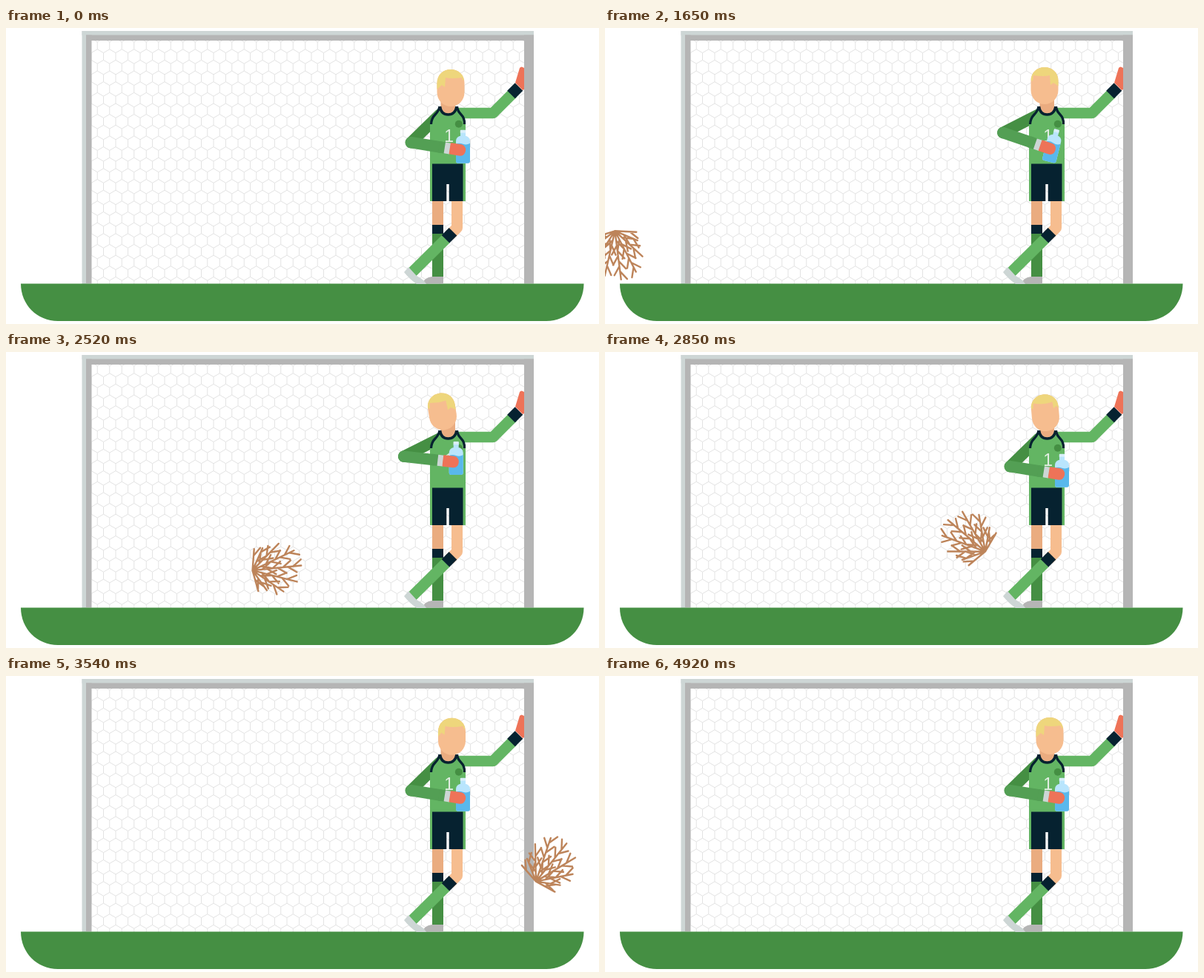
These frames come from a looping animation (800x400 px, 4.95 s). An HTML page with a canvas:

```html
<!DOCTYPE html>
<html lang="en">
<head>
<meta charset="utf-8">
<title>Goalkeeper and tumbleweed</title>
<style>
  html, body { margin: 0; width: 100%; height: 100%; overflow: hidden; background: #fff; }
  canvas { display: block; }
</style>
</head>
<body>
<canvas id="stage" width="800" height="400"></canvas>
<script>
const g = document.getElementById('stage').getContext('2d');
const LOOP = 4950;
const GREEN = '#63b563', MID = '#539f54', DARK = '#458f43', NAVY = '#062230';
const SKIN = '#f6bd8f', SHADE = '#eaac80', GLOVE = '#ee7358', LIGHT = '#cdd6d5', GREY = '#b5b5b5';
const rad = d => d * Math.PI / 180;

// Keys: time, then values
const headKeys = [ // x, y, tilt, turn
  [0, 600, 81, 0, -1], [60, 600, 81, 0, -1], [520, 597, 79, 0, 0], [1100, 597, 79, 0, 0],
  [1450, 593, 77.5, 0, 1], [1650, 593, 78, 0, 1], [2520, 588.5, 80.5, -9, 1],
  [3210, 600, 84, 0, 0], [3700, 602, 81, 0, -1], [4350, 602, 81, 0, -1], [4860, 600, 81, 0, -1], [LOOP, 600, 81, 0, -1]
];
const armKeys = [ // upper arm angle, forearm angle, bottle tilt, drinking
  [0, 135.7, 9, 0, 0], [160, 140, 15, 10, 0], [520, 180, -22, 0, 1], [1100, 180, -22, 0, 1],
  [1650, 153, 19, 14, 0], [1920, 146, 14, 10, 0], [2520, 153.5, 6.5, 0, 0], [2800, 135.7, 9, 0, 0], [LOOP, 135.7, 9, 0, 0]
];

function pose(keys, t) {
  const i = keys.findIndex(k => k[0] > t), a = keys[i - 1], b = keys[i];
  const p = (t - a[0]) / (b[0] - a[0]), e = p * p * (3 - 2 * p);
  return a.slice(1).map((v, n) => v + (b[n + 1] - v) * e);
}
function fill(d, color) { g.fillStyle = color; g.fill(new Path2D(d)); }
function line(d, color, width, cap = 'butt') {
  g.strokeStyle = color; g.lineWidth = width; g.lineCap = cap; g.lineJoin = 'round';
  g.stroke(d instanceof Path2D ? d : new Path2D(d));
}
function rect(x, y, w, h, color, r = 0) {
  g.fillStyle = color; g.beginPath(); g.roundRect(x, y, w, h, r); g.fill();
}
function oval(x, y, rx, ry, color) {
  g.fillStyle = color; g.beginPath(); g.ellipse(x, y, rx, ry, 0, 0, 7); g.fill();
}
function at(x, y, angle, draw) {
  g.save(); g.translate(x, y); g.rotate(rad(angle)); draw(); g.restore();
}

const net = new Path2D();
for (let r = 0; r < 24; r++) {
  const y = 16.5 + r * 14.65;
  for (let k = 0; k < 73; k++) {
    const x = 115 + k * 8.25, low = (k + r) % 2;
    net[k ? 'lineTo' : 'moveTo'](x, y + (low ? 2.4 : -2.4));
    if (low) { net.lineTo(x, y + 12.25); net.moveTo(x, y + 2.4); }
  }
}

// Branches fan out from one root, with side twigs kept inside a disc
const weed = new Path2D();
for (let i = -4; i <= 4; i++) {
  const a = rad(90 + i * 20), len = Math.max(29, 66 * Math.cos(rad(i * 20)));
  const dx = Math.cos(a), dy = Math.sin(a);
  weed.moveTo(0, -32); weed.lineTo(dx * len, dy * len - 32);
  for (let d = 13, side = i % 2 ? 1 : -1; d < len - 3; d += 7, side = -side) {
    const b = a + side * rad(36), x = dx * d, y = dy * d - 32;
    const ex = x + Math.cos(b) * 14, ey = y + Math.sin(b) * 14;
    if (ey < -31 || Math.hypot(ex, ey) > 39) continue;
    weed.moveTo(x, y); weed.lineTo(ex, ey);
  }
}

function scene() {
  g.save();
  g.beginPath(); g.rect(115, 17, 584, 329); g.clip();
  line(net, '#e3e3e3', 1);
  g.restore();
  rect(102.5, 4, 609.5, 6, LIGHT);
  rect(102.5, 4, 5.5, 342, LIGHT);
  rect(108, 9.5, 604, 7.5, GREY);
  rect(108, 9.5, 7.5, 336, GREY);
  rect(699, 9.5, 13, 336, GREY);
  fill('M20 345.5H779.5C779.5 374 757 396 729 396H70C42 396 20 374 20 345.5Z', DARK);
}

function legs() {
  rect(575, 232, 15, 35, SHADE);
  rect(575, 266, 15, 12, NAVY);
  rect(575, 278, 15, 59, DARK);
  fill('M590 336V345.5H562Q564 337 575 336Z', GREY);
  line('M608.5 232V270L598 280.5', SKIN, 15);
  line('M593.5 285L548 330', GREEN, 15);
  line('M603 275.3L593 285.3', NAVY, 15);
  fill('M543 323L537 330Q544 339 554 346H567Q565 341 553.5 334.5Z', LIGHT);
}

function body() {
  line('M606 115H657L684 88', GREEN, 14.5);
  line('M681.5 90L692 79.5', NAVY, 15);
  fill('M687 74L693 54Q695 51 699 54V83L697 84Z', GLOVE);
  fill('M572 234V130Q573 122 579 117T585 106H608.5Q609 112 614.5 117T620 130V234H616V184H575V234Z', GREEN);
  fill('M575 183.5H616.5V234H597.7V211H594.3V234H575Z', NAVY);
  fill('M586.5 92H606V109Q604 117 596.5 117Q589 117 586.5 109Z', SHADE);
  line('M585.5 106Q587 117 596.5 117Q606 117 608 106', NAVY, 3.5);
  line('M585 106Q584 112 579 117T573.5 130M608.5 106Q609 112 614 117T618.5 130', NAVY, 3.2);
  oval(610.8, 129.7, 5, 5, DARK);
  g.fillStyle = '#e2eee2';
  g.font = '23px "Liberation Sans", sans-serif';
  g.fillText('1', 591.3, 154);
}

function head([x, y, tilt, turn]) {
  const left = Math.max(0, -turn), right = Math.max(0, turn);
  at(x, y, tilt, () => {
    g.clip(new Path2D('M-18.5 -6.5C-18.5 -18 -10 -25 0 -25S18.5 -18 18.5 -6.5V6C18.5 17 10 25 0 25S-18.5 17 -18.5 6Z'));
    rect(-20, -26, 40, 52, SKIN);
    const xl = -15 + 8 * left, xr = 15 - 8 * right;
    const yl = -6 + 5 * left, yr = -10 + 9 * right;
    fill(`M-20 -26H20V${yr + 2}L${xr + 5} ${yr - 3}L${xr + 1} ${yr}L${xr} -14
      Q0 ${-9 - 3 * (left + right)} ${xl} -14L${xl - 1} ${yl}L${xl - 5} ${yl - 3}L-20 ${yl + 4}Z`, '#eed67c');
  });
}

function bottle() {
  rect(-3.7, -23, 7.4, 5, '#d9effb', 1);
  rect(-3.5, -19, 7, 7, '#b9e5fd');
  rect(-9.5, -15, 19, 37, '#b9e5fd', [7, 7, 3, 3]);
  fill('M-9.5 -4Q-5 -6 0 -4T9.5 -5V19Q9.5 22 6.5 22H-6.5Q-9.5 22 -9.5 19Z', '#59b8ec');
}

function arm([upper, fore, tilt, drink], drawFront) {
  const ex = 585 + 54 * Math.cos(rad(upper)), ey = 117 + 54 * Math.sin(rad(upper));
  if (!drawFront) return line(`M585 117L${ex} ${ey}`, DARK, 15.5, 'round');
  const hx = ex + 70 * Math.cos(rad(fore)), hy = ey + 70 * Math.sin(rad(fore));
  const turn = rad(drink * 90);
  at(hx + 1 + 4 * drink, hy - 5 + 7 * drink, tilt, () => {
    g.scale(1, Math.max(0.22, Math.cos(turn)));
    bottle();
  });
  at(ex, ey, fore, () => {
    line('M0 0H40', MID, 15.5, 'round');
    rect(38, -7.7, 9, 15.4, MID);
    rect(46, -7.5, 7.5, 15, LIGHT);
    rect(53, -8, 21.5, 15.5, GLOVE, [1, 7, 7, 1]);
  });
  if (drink > 0.02) oval(hx + 2 * drink, hy + 17 - 7 * drink, 10, 10 * Math.sin(turn), '#0b93dd');
}

function tumbleweed(t) {
  const u = t - 1650;
  if (u < -200 || u > 2300) return;
  const x = 17 + 0.4152 * u - 1.878e-5 * u * u;
  const hop = (((t - 1667) / 788) % 1 + 1) % 1;
  const y = 311 - 4 * 62 * hop * (1 - hop);
  at(x, y, 1.82 * (x - 17) - 8, () => line(weed, '#bd845a', 2.4, 'round'));
}

function frame() {
  const t = performance.now() % LOOP, armPose = pose(armKeys, t);
  g.fillStyle = '#fff';
  g.fillRect(0, 0, 800, 400);
  scene();
  arm(armPose, false);
  legs();
  body();
  head(pose(headKeys, t));
  arm(armPose, true);
  tumbleweed(t);
  requestAnimationFrame(frame);
}
frame();
</script>
</body>
</html>
```
